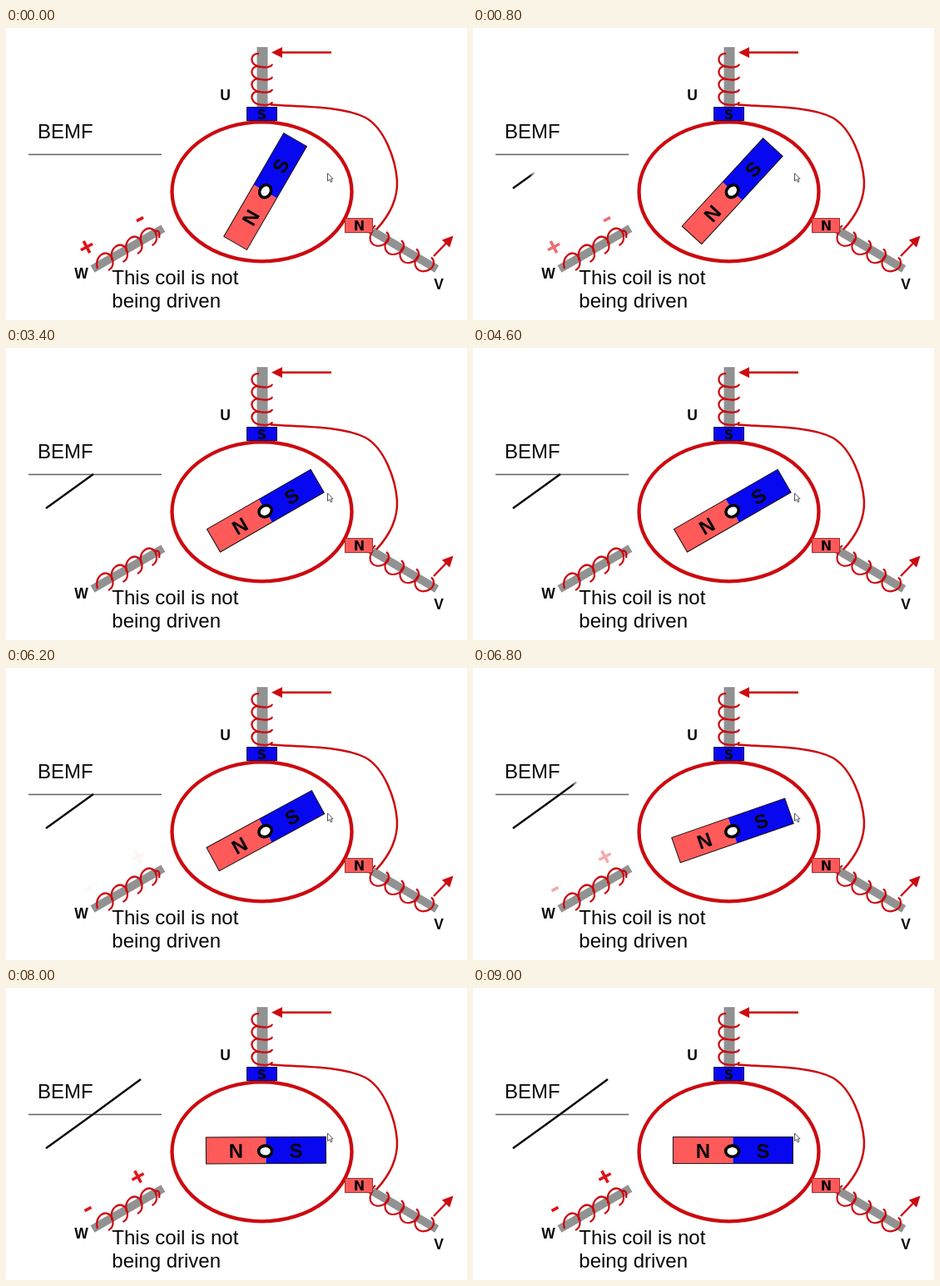
An HTML page with a canvas for the animation above (9.4 s loop, 554 px wide and 352 px high).

```html
<!DOCTYPE html>
<html lang="en">
<head>
<meta charset="utf-8">
<title>Back EMF in an undriven coil</title>
<style>
  html, body { margin: 0; width: 100%; height: 100%; overflow: hidden; background: #fff; }
  canvas { display: block; }
</style>
</head>
<body>
<canvas id="stage" width="554" height="352"></canvas>
<script>
const ctx = document.getElementById('stage').getContext('2d');

const LOOP = 9400, STEP = 200;
const SPIN = 0.0157;      // degrees per ms
const WIPE = 0.0367;      // pixels per ms
const HALF = 30;          // degrees turned in each phase
const SPAN = 57;          // width of each half of the trace
const SECOND = 6110;      // start of the second phase
const RED = '#cc0a10', BLUE = '#0808f0', PINK = '#ff5a5a', GREY = '#929292', INK = '#080808';
const SANS = '"Liberation Sans", Arial, sans-serif';
const HEAVY = 'bold 16px "DejaVu Sans", sans-serif';

const clamp = (v, lo, hi) => Math.min(hi, Math.max(lo, v));

function text(str, x, y, font, align = 'left') {
  ctx.font = font;
  ctx.textAlign = align;
  ctx.fillStyle = INK;
  ctx.fillText(str, x, y);
}

function stroke(d, color, width) {
  ctx.strokeStyle = color;
  ctx.lineWidth = width;
  ctx.stroke(new Path2D(d));
}

function fill(d, color) {
  ctx.fillStyle = color;
  ctx.fill(new Path2D(d));
}

function box(x, y, w, h, color, edge) {
  ctx.fillStyle = color;
  ctx.fillRect(x, y, w, h);
  if (edge) {
    ctx.strokeStyle = edge;
    ctx.lineWidth = 1;
    ctx.strokeRect(x, y, w, h);
  }
}

function at(x, y, deg, draw) {
  ctx.save();
  ctx.translate(x, y);
  ctx.rotate(deg * Math.PI / 180);
  draw();
  ctx.restore();
}

// One winding repeated along a core
function windings(d, dx, dy) {
  for (let i = 0; i < 4; i++) {
    at(dx * i, dy * i, 0, () => stroke(d, RED, 2.3));
  }
}

function arrow(x1, y1, x2, y2) {
  const angle = Math.atan2(y2 - y1, x2 - x1) * 180 / Math.PI;
  const len = Math.hypot(x2 - x1, y2 - y1);
  at(x1, y1, angle, () => {
    stroke(`M0 0H${len - 8}`, RED, 2.4);
    fill(`M${len} 0l-13 -6.5v13z`, RED);
  });
}

function coils() {
  box(301.5, 23, 13, 73, GREY);
  windings('M304 31C293 30 292 44 304 46.5C311 48 319 47.5 320 43.5', 0, 15.2);
  arrow(391, 29.5, 319, 29.5);

  at(104, 290.5, -30, () => box(0, -5, 98, 10, GREY));
  windings('M110 290C105 276 120 265 127 276C130 282 129 289 123 292', 17.5, -10);
  stroke('M178 245C184 243 185 247 184 253', RED, 2.3);

  at(438, 243.5, 30.5, () => box(0, -5, 92.5, 10, GREY));
  windings('M441 244C432 256 442 267 454 261C462 257 461 249 457 246', 18, 10.2);
  stroke('M438 243l6 -5', RED, 2);
  arrow(514, 275, 537.5, 250.5);

  stroke('M318 92.5C355 95 405 94 432 108C455 121 468 158 470 184C471 208 458 229 445 243', RED, 2.5);
}

function poles() {
  ctx.strokeStyle = RED;
  ctx.lineWidth = 4.3;
  ctx.beginPath();
  ctx.ellipse(307.5, 197.3, 108, 84, 0, 0, Math.PI * 2);
  ctx.stroke();
  box(289.5, 95.5, 36, 16, BLUE, '#10104a');
  text('S', 307.5, 109.5, HEAVY, 'center');
  box(407.5, 229.5, 33, 17, PINK, '#a03030');
  text('N', 424.5, 243.5, HEAVY, 'center');
}

function labels() {
  text('BEMF', 38, 133, '24px ' + SANS);
  text('This coil is not', 127.3, 308.7, '24px ' + SANS);
  text('being driven', 127.3, 337.2, '24px ' + SANS);
  const bold = 'bold 17.5px ' + SANS;
  text('U', 263.5, 87, bold, 'center');
  text('W', 90.5, 302, bold, 'center');
  text('V', 520, 315, bold, 'center');
}

function sign(x, y, plus, alpha) {
  if (alpha <= 0) return;
  ctx.globalAlpha = alpha;
  at(x, y, -28, () => {
    const d = plus ? 'M-8 0H8M0 -8V8' : 'M-4.5 0H4.5';
    stroke(d, '#e01018', 3.6);
  });
  ctx.globalAlpha = 1;
}

// Trace segment revealed from left to right, with a soft edge
function trace(x, y, rise, len) {
  if (len <= 0) return;
  let color = INK;
  if (len < SPAN) {
    color = ctx.createLinearGradient(x + len - 6, 0, x + len + 1, 0);
    color.addColorStop(0, INK);
    color.addColorStop(1, 'rgba(8, 8, 8, 0)');
  }
  stroke(`M${x} ${y}l${len} ${-rise * len / SPAN}`, color, 2.4);
}

function magnet(turned) {
  const angle = turned - 60;
  // The bar sits slightly off its pivot
  at(313.2, 197, angle, () => {
    ctx.translate(-0.8, -1.4);
    box(-72, -16, 72, 32, PINK);
    box(0, -16, 72, 32, BLUE);
    ctx.strokeStyle = '#1a1010';
    ctx.lineWidth = 1;
    ctx.strokeRect(-72, -16, 144, 32);
    text('N', -36, 9, 'bold 24px ' + SANS, 'center');
    text('S', 36, 9, 'bold 24px ' + SANS, 'center');
  });
  at(311.6, 196.7, angle, () => {
    ctx.beginPath();
    ctx.ellipse(0, 0, 8, 6.6, 0, 0, Math.PI * 2);
    ctx.fillStyle = '#fff';
    ctx.fill();
    ctx.strokeStyle = '#000';
    ctx.lineWidth = 3.6;
    ctx.stroke();
  });
}

function pointer() {
  const d = 'M386.5 175v9.5l2.2 -2l1.6 3.5l1.6 -0.8l-1.6 -3.3h2.8z';
  fill(d, '#fff');
  stroke(d, '#505058', 1);
}

function render(t) {
  const late = t - SECOND;
  const first = clamp(t * SPIN, 0, HALF);
  const second = clamp(late * SPIN, 0, HALF);

  ctx.fillStyle = '#fff';
  ctx.fillRect(0, 0, 554, 352);
  coils();
  poles();
  labels();

  stroke('M27 152.5H187', '#606060', 1.3);
  trace(48, 193.3, 41.3, clamp((t - 91) * WIPE, 0, SPAN));
  trace(105, 152, 42, clamp((late - 150) * WIPE, 0, SPAN));

  const out = 1 - t / 2000;
  sign(97, 264, true, out);
  sign(161, 230.5, false, out);
  const fresh = clamp(late / 1935, 0, 1);
  sign(158.5, 227.5, true, fresh);
  sign(98.5, 266.5, false, fresh);

  magnet(first + second);
  pointer();
}

const start = performance.now();
function tick() {
  const t = (performance.now() - start) % LOOP;
  render(Math.floor(t / STEP) * STEP);
  requestAnimationFrame(tick);
}
tick();
</script>
</body>
</html>
```
